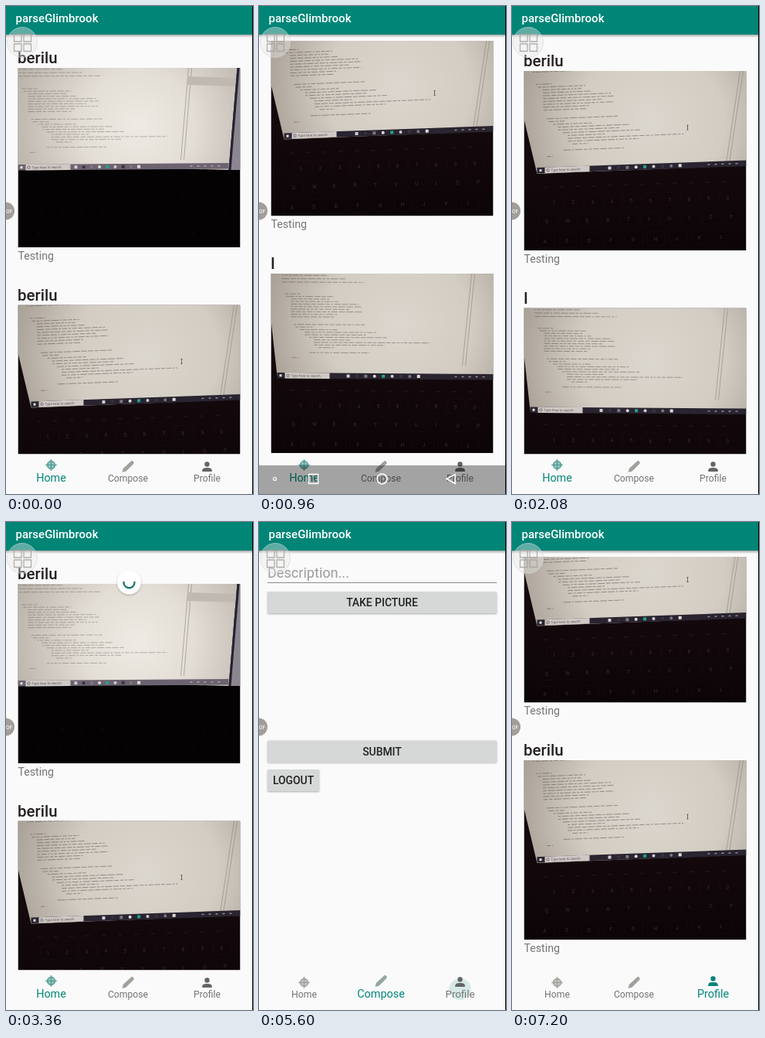
Animation, 320 px wide and 631 px high, one loop 7360 ms. Source, as an HTML page:

```html
<!DOCTYPE html>
<html lang="en">
<head>
<meta charset="utf-8">
<title>Photo feed</title>
<style>
  html, body { margin: 0; width: 100%; height: 100%; overflow: hidden; background: #fafafa; }
  svg { display: block; width: 100%; height: 100%; font-family: Roboto, "Open Sans", sans-serif; }
  .medium { font-weight: 500; }
  .mid { text-anchor: middle; }
</style>
</head>
<body>
<svg id="stage" viewBox="0 0 320 631">
  <defs>
    <clipPath id="listClip"><rect y="45" width="320" height="534.5"/></clipPath>
    <clipPath id="photoClip"><rect width="288" height="232"/></clipPath>
    <clipPath id="bodyClip"><rect y="37" width="320" height="594"/></clipPath>
    <radialGradient id="bright" gradientUnits="userSpaceOnUse" cx="155" cy="75" r="185">
      <stop offset="0" stop-color="#efebe4"/><stop offset=".4" stop-color="#e2ddd5"/>
      <stop offset="1" stop-color="#b3aba2"/>
    </radialGradient>
    <radialGradient id="paper" gradientUnits="userSpaceOnUse" cx="165" cy="65" r="190">
      <stop offset="0" stop-color="#dcd7ce"/><stop offset=".5" stop-color="#d2ccc2"/>
      <stop offset="1" stop-color="#a1988e"/>
    </radialGradient>
    <linearGradient id="desk" x2="0" y2="1">
      <stop offset=".5" stop-color="#14090c"/><stop offset="1" stop-color="#0b0406"/>
    </linearGradient>
    <linearGradient id="shade" x2="0" y2="1">
      <stop offset="0" stop-opacity=".32"/><stop offset="1" stop-opacity="0"/>
    </linearGradient>
    <filter id="soft" x="-50%" y="-50%" width="200%" height="200%">
      <feDropShadow dx="0" dy="1" stdDeviation="1.3" flood-opacity=".32"/>
    </filter>
  </defs>
  <rect width="320" height="631" fill="#fafafa"/>

  <g clip-path="url(#listClip)">
    <g id="home"></g>
    <g id="profile"></g>
  </g>

  <g id="compose">
    <text x="11" y="72" font-size="18.1" fill="#9b9b9b">Description...</text>
    <rect x="11" y="78" width="297" height="1" fill="#8c8c8c"/>
  </g>

  <g clip-path="url(#bodyClip)">
    <g id="spinner">
      <circle r="15.5" fill="#fff" filter="url(#soft)"/>
      <path id="arc" d="M-7 -1V.3A7 7 0 0 0 7 .3V-1" fill="none" stroke="#0b6f65" stroke-width="2.2"/>
    </g>
  </g>

  <rect y="579.5" width="320" height="52" fill="#fafafa"/>
  <g id="tabs"></g>

  <rect y="37" width="320" height="4" fill="url(#shade)"/>
  <rect width="320" height="37" fill="#008577"/>
  <text class="medium" x="12.5" y="21" font-size="15" fill="#fff">parseGlimbrook</text>

  <g id="navBar">
    <rect y="594" width="320" height="37" fill-opacity=".35"/>
    <g fill="none" stroke="#fff" stroke-width="1.5">
      <circle cx="20.5" cy="611.5" r="2" stroke-width="1.2"/>
      <rect x="64.5" y="605.5" width="12" height="12"/>
      <circle cx="159.5" cy="611.5" r="6.5"/>
      <path d="M254 605.5V617.5L243 611.5Z"/>
    </g>
  </g>

  <circle cx="21" cy="47" r="19.5" fill="#e9e9e8" fill-opacity=".4" stroke="#d4d4d3" stroke-opacity=".6"/>
  <path d="M10.5 36.5h9.5v9.5h-9.5zM23 36.5h9.5v9.5h-9.5zM10.5 49h9.5v9.5h-9.5zM23 49h9.5v9.5h-9.5z"
        fill="none" stroke="#a5a29e" stroke-opacity=".85" stroke-width="1.3"/>
  <circle cx="-.5" cy="265" r="11.5" fill="#a19d99"/>
  <text class="medium" x="0" y="267.5" font-size="6.5" fill="#f4f2f0">OF</text>
  <rect x="319" width="1" height="631"/>
</svg>

<script>
const LOOP = 7360, STEP = 160, PITCH = 306.5, TEAL = '#008577';
const $ = id => document.getElementById(id);

function add(parent, tag, attrs = {}, text) {
  const el = document.createElementNS('http://www.w3.org/2000/svg', tag);
  for (const k in attrs) el.setAttribute(k, attrs[k]);
  if (text) el.textContent = text;
  parent.appendChild(el);
  return el;
}

function seeded(s) {
  return () => (s = (s * 16807) % 2147483647) / 2147483647;
}

// Piecewise linear value from [time, value] steps
function at(steps, t) {
  if (t <= steps[0][0]) return steps[0][1];
  for (let i = 1; i < steps.length; i++) {
    const [t0, a] = steps[i - 1], [t1, b] = steps[i];
    if (t < t1) return a + (b - a) * (t - t0) / (t1 - t0);
  }
  return steps[steps.length - 1][1];
}

// Code on the laptop screen: [indent, length], length 0 is a blank row
const CODE = [
  [0, 20], [2, 62], [8, 50], [8, 62], [8, 88], [8, 92], [8, 76], [8, 92], [8, 60], [8, 56],
  [0, 0], [0, 0], [12, 92], [14, 22], [20, 50], [26, 92], [26, 80], [32, 100], [38, 48],
  [38, 150], [38, 92], [44, 20], [0, 0], [32, 78], [0, 0], [10, 8]
];
const KEYS = ['1234567890', 'QWERTYUIOP', 'ASDFGHJKL'];

const PHOTOS = [
  { screen: '0,0 284,0 273,132 0,125', paper: 'url(#bright)', bar: [0, 125, 273, 123], barFill: '#6d6370',
    icons: 73, iconGap: 10.2, split: [221, 211], tilt: -0.3, top: 27, gap: 3.3, x: 5, head: 3,
    ink: .4, desk: '#040203', keys: .1, keyY: 166, slope: .2 },
  { screen: '0,0 288,0 288,122 17,133 0,62', paper: 'url(#paper)', bar: [17, 125, 288, 115.5], barFill: '#292430',
    icons: 109, iconGap: 11.4, split: [280, 262], tilt: -2.2, top: 18, gap: 3.75, x: 16, head: 1,
    ink: .55, desk: 'url(#desk)', keys: .5, keyY: 173, slope: -.7 },
  { screen: '0,0 288,0 288,133 8,132 0,60', paper: 'url(#paper)', bar: [8, 128, 288, 130], barFill: '#292430',
    icons: 98, iconGap: 11.4, split: [260, 248], tilt: .3, top: 26, gap: 3.3, x: 18, head: 3,
    ink: .5, desk: 'url(#desk)', keys: .5, keyY: 173, slope: .2 }
];

function codeRow(g, rnd, x, y, len) {
  let d = '';
  for (let u = x; u < x + len;) {
    const w = 2 + rnd() * 8;
    d += `M${u.toFixed(1)} ${y}h${Math.min(w, x + len - u).toFixed(1)}`;
    u += w + 1.6;
  }
  add(g, 'path', { d });
}

function drawTaskbar(g, p) {
  const [x0, y0, x1, y1] = p.bar, slope = (y1 - y0) / (x1 - x0);
  const bar = add(g, 'g', { transform: `translate(${x0} ${y0}) skewY(${Math.atan(slope) * 180 / Math.PI})` });
  add(bar, 'rect', { width: x1 - x0, height: 7.5, fill: p.barFill });
  add(bar, 'rect', { x: 10, width: 58, height: 7.5, fill: '#cfc8c5' });
  add(bar, 'circle', { cx: 14, cy: 3.8, r: 1.7, fill: 'none', stroke: '#4a444a', 'stroke-width': .7 });
  add(bar, 'text', { x: 18, y: 5.4, 'font-size': 4.4, fill: '#5b555a' }, 'Type here to search');
  add(bar, 'rect', { x: 3, y: 2.3, width: 3, height: 3, fill: '#e6e1e0' });
  const tints = ['#d0ccd0', '#7a7783', '#24a08d', '#37323c', '#e0dbd4'];
  for (let i = 0; i < 9; i++)
    add(bar, 'rect', { x: p.icons - x0 + i * p.iconGap, y: 1.8, width: 4, height: 4, rx: i % 2 ? 2 : .4,
      fill: tints[i * 3 % 5] });
  for (let x = x1 - x0 - 50; x < x1 - x0 - 5; x += 9)
    add(bar, 'rect', { x, y: 3, width: 3, height: 1.4, fill: '#d0ccd0', opacity: .65 });
}

function drawKeys(g, p) {
  const keys = add(g, 'g', { 'font-size': 6.5, fill: '#694d4d', opacity: p.keys });
  KEYS.forEach((row, r) => [...row].forEach((c, i) => {
    const x = [37, 27, 25][r] + i * [25, 26.6, 28.6][r];
    const y = p.keyY + [0, 24, 50][r] + i * p.slope;
    add(keys, 'text', { x, y }, c);
    add(keys, 'rect', { x: x - 8, y: y - 12, width: 23, height: 18, rx: 2, fill: 'none',
      stroke: '#51363b', 'stroke-width': .5, opacity: .35 });
  }));
  for (let i = 0; i < 12; i++)
    add(keys, 'rect', { x: 25 + i * 21, y: p.keyY - 23 + i * p.slope, width: 5, height: 1.4, opacity: .4 });
}

function drawPhoto(p, n) {
  const rnd = seeded(4711 + n * 97);
  const g = add(document.querySelector('defs'), 'g', { id: 'photo' + n, 'clip-path': 'url(#photoClip)' });
  add(g, 'rect', { width: 288, height: 232, fill: p.desk });
  add(g, 'polygon', { points: p.screen, fill: p.paper });

  const [s0, s1] = p.split;
  add(g, 'path', { d: `M${s0} 0L${s1} 119m4 0L${s0 + 4} 0`, stroke: '#8a837d', 'stroke-width': .6, fill: 'none' });

  const code = add(g, 'g', { stroke: '#4c4744', 'stroke-width': .9, 'stroke-opacity': p.ink,
    transform: `rotate(${p.tilt} 0 ${p.top})` });
  for (let i = 0; i < p.head; i++) codeRow(code, rnd, p.x - 4, 2 + i * 4.4, 58 + i * 24);
  CODE.forEach(([dx, len], i) => len && codeRow(code, rnd, p.x + dx, +(p.top + i * p.gap).toFixed(1), len));

  if (n === 0) {
    add(g, 'path', { d: 'M220 11L283 13L282 24L219 22Z', fill: '#c0b9b1' });
    codeRow(code, rnd, 257, 18, 14);
    add(g, 'path', { d: 'M284 0H288V132H273Z', fill: '#8b8690' });
    add(g, 'path', { d: 'M284 0H287L276 132H273Z', fill: '#262231' });
  }
  if (n === 1) add(g, 'path', { d: 'M212 70v6m-1 -6h2m-2 6h2', stroke: '#39332f', 'stroke-width': .7 });

  drawTaskbar(g, p);
  drawKeys(g, p);
}
PHOTOS.forEach(drawPhoto);

function fillFeed(feed, posts) {
  posts.forEach(([name, n], i) => {
    const g = add(feed, 'g', { transform: `translate(15.5 ${80 + i * PITCH})` });
    add(g, 'text', { class: 'medium', x: -.5, y: -6, 'font-size': 20.5, fill: '#241f20' }, name);
    add(g, 'use', { href: '#photo' + n });
    add(g, 'text', { x: 0, y: 247.5, 'font-size': 14.2, fill: '#757575' }, 'Testing');
  });
}
fillFeed($('home'), [['berilu', 0], ['berilu', 1], ['I', 2]]);
fillFeed($('profile'), [['berilu', 0], ['berilu', 1], ['berilu', 1]]);

function button(x, y, w, label) {
  const g = add($('compose'), 'g');
  add(g, 'rect', { x, y, width: w, height: 28, rx: 1.5, fill: '#d6d7d7', filter: 'url(#soft)' });
  add(g, 'text', { class: 'medium mid', x: x + w / 2, y: y + 19, 'font-size': 13.9, fill: '#222' }, label);
}
button(11, 90, 297, 'TAKE PICTURE');
button(11, 282.5, 297, 'SUBMIT');
button(11, 320, 67, 'LOGOUT');

const ICONS = {
  Home: 'M0 -7.3V7.3M-7.3 0H7.3M-4.8 0a4.8 4.8 0 1 0 9.6 0a4.8 4.8 0 1 0 -9.6 0',
  Compose: 'M-7.5 7.5L-6.2 2.6L3.6 -6.6Q5.2 -8.2 7 -6.6Q8.6 -4.8 7 -3.2L-2.6 6.2Z',
  Profile: 'M-3.2 -3a3.2 3.2 0 1 0 6.4 0a3.2 3.2 0 1 0 -6.4 0M-6.3 6.5V4.7Q-6 1.6 0 1.5Q6 1.6 6.3 4.7V6.5Z'
};
const LOOKS = { Home: ['#a3a09c', '#55a097'], Compose: ['#a3a09c', '#93a6a2'], Profile: ['#646464', TEAL] };

const tabs = Object.keys(ICONS).map((name, i) => {
  const g = add($('tabs'), 'g', { transform: `translate(${[58.5, 158, 260.5][i]} 0)` });
  const ripple = add(g, 'circle', { cy: 604, fill: TEAL });
  const icon = add(g, 'path', { d: ICONS[name] });
  const label = add(g, 'text', { class: 'mid', y: 615.2 }, name);
  return { name, ripple, icon, label };
});

const SCROLL_HOME = [[480, 0], [640, 40], [800, 170], [960, 347], [1120, 378], [1280, 385], [1760, 385],
  [1920, 360], [2080, 302.5], [2240, 200], [2400, 100], [2560, 30], [2720, 0]];
const SCROLL_PROFILE = [[6080, 0], [6240, 12], [6400, 62], [6560, 150], [6720, 245], [6880, 325],
  [7040, 370], [7200, 385]];
const NAV = [[480, 0], [800, 1], [1600, 1], [1920, 0]];
const PULL = [[2720, 18], [2880, 40], [3040, 66], [3200, 78]];
const SPIN_SIZE = [[3520, 1], [3680, 0]];
const ACTIVE = [
  [[3680, 1], [4000, 0]],
  [[3680, 0], [4000, 1], [5600, 1], [5760, 0]],
  [[5440, 0], [5760, 1]]
];
const TAPS = [-1, 3680, 5600];

const show = (el, on) => el.setAttribute('visibility', on ? 'visible' : 'hidden');

function drawTab(tab, i, t) {
  const a = at(ACTIVE[i], t), tint = LOOKS[tab.name][a > .5 ? 1 : 0];
  const lined = tab.name === 'Home';
  tab.icon.setAttribute('transform', `translate(0 ${595.5 - 2 * a})`);
  tab.icon.setAttribute('fill', lined ? tint + '88' : tint);
  if (lined) {
    tab.icon.setAttribute('stroke', tint);
    tab.icon.setAttribute('stroke-width', 1.7);
  }
  tab.label.setAttribute('font-size', 12.2 + 2.2 * a);
  tab.label.setAttribute('fill', a > .5 ? TEAL : '#737373');
  const k = (t - TAPS[i]) / 640;
  const live = TAPS[i] > 0 && k >= 0 && k < 1;
  tab.ripple.setAttribute('r', live ? 14 + 14 * Math.min(1, k * 2) : 0);
  tab.ripple.setAttribute('opacity', live ? .14 * (1 - k) : 0);
}

function draw(t) {
  show($('home'), t < 3840);
  show($('compose'), t >= 3840 && t < 5760);
  show($('profile'), t >= 5920);
  $('home').setAttribute('transform', `translate(0 ${-at(SCROLL_HOME, t)})`);
  $('profile').setAttribute('transform', `translate(0 ${-at(SCROLL_PROFILE, t)})`);
  $('navBar').setAttribute('opacity', at(NAV, t));

  show($('spinner'), t > 2720 && t < 3680);
  $('spinner').setAttribute('transform', `translate(159.5 ${at(PULL, t)}) scale(${at(SPIN_SIZE, t)})`);
  $('arc').setAttribute('transform', `rotate(${(t - 3360) * .3})`);
  tabs.forEach((tab, i) => drawTab(tab, i, t));
}

const start = performance.now();
function tick() {
  const t = (performance.now() - start) % LOOP;
  draw(Math.floor(t / STEP) * STEP);
  requestAnimationFrame(tick);
}
tick();
</script>
</body>
</html>
```
